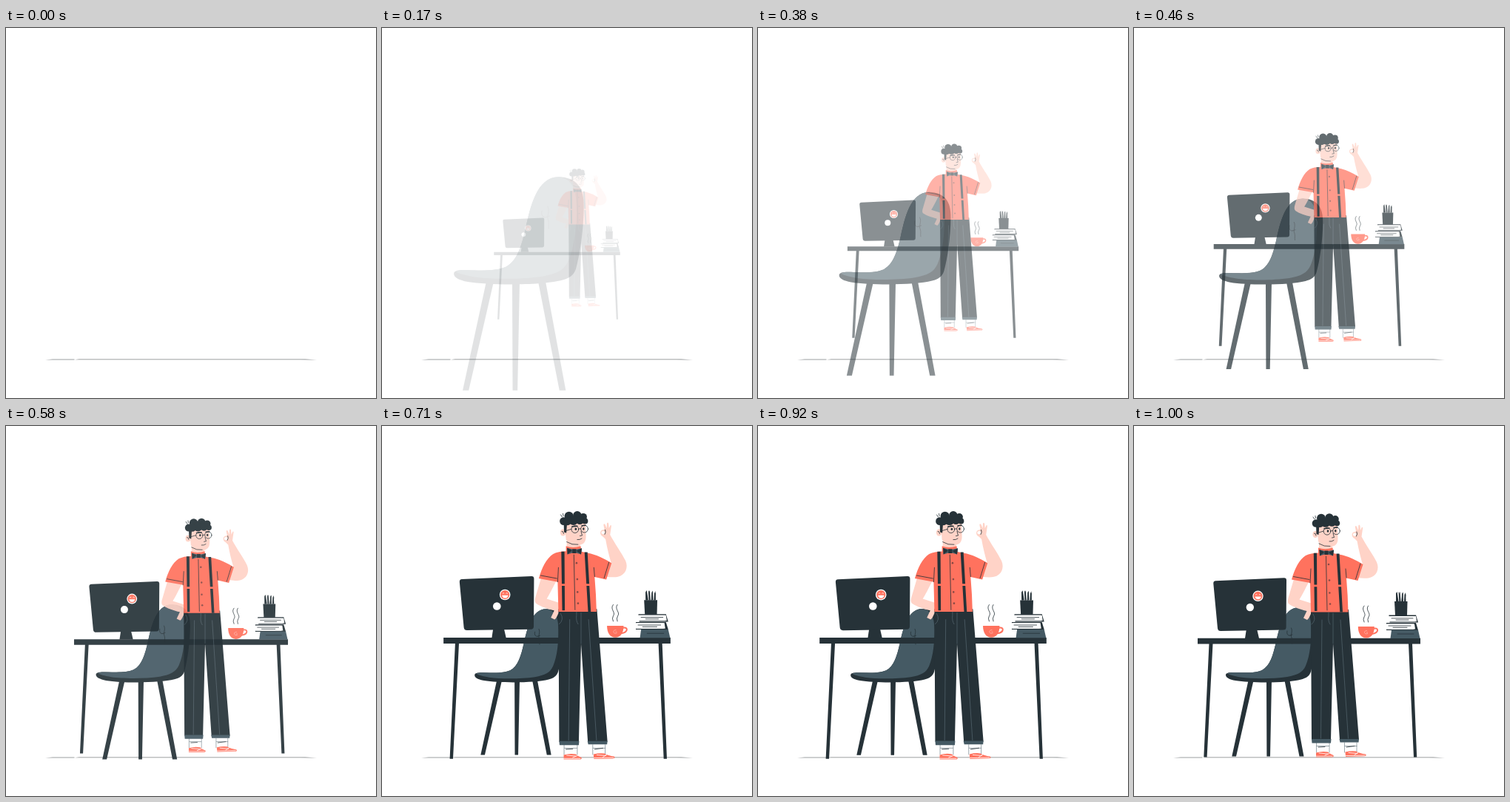
Write an HTML page that moves like this. It is 500 px wide and 500 px high and loops after 1040 ms.

```html
<!DOCTYPE html>
<html lang="en">
<head>
<meta charset="utf-8">
<title>Office scene</title>
<style>
  html, body { margin: 0; width: 100%; height: 100%; overflow: hidden; background: #fff; }
  svg { display: block; width: 100%; height: 100%; }
  .group { opacity: 0; }
  .dark { fill: #263238; }
  .slate { fill: #455a64; }
  .red { fill: #ff725e; }
  .skin { fill: #ffd3c7; }
  .white { fill: #fff; }
  .line { fill: none; stroke: #263238; stroke-width: .8; stroke-linecap: round; stroke-linejoin: round; }
  .soft { stroke: #5d6f78; stroke-width: .6; }
  .pale { stroke: #fff; }
</style>
</head>
<body>
<svg viewBox="0 0 500 500">
  <!-- floor -->
  <g fill="#bdbfc0">
    <path d="M53 448.8L63 447.2H92.5V448.7Z"/>
    <path d="M93 448.3L99 447H404L420 448.8H408L398 448.5H97Z"/>
  </g>

  <g class="group" data-x="186" data-y="346.5" data-from="1.5">
    <path class="dark" d="M154.500 344H161.500L138 446.500H132.300ZM179 345H186L184 446.500H179.400ZM203.500 344H210.500L229.500 446.500H223.500Z"/>
    <path class="dark" d="M124 336.500C124 333 130 332.800 136 333C152 333.500 164 334 173 330C184 324 188 309 191.500 294C196 274 202 245 223 245.200C239 245.500 247 255 246.500 273C246.300 295 243 318 239 332C237 338 233 340.500 226 342.500C207 347.500 158 347.500 137 344C129 342.500 124 340 124 336.500Z"/>
    <path class="slate" d="M126 334.300C130 332.500 136 333 140 333.100C155 333.500 165 333.500 173 330C184 324 188 309 191.500 294C196 274 202 245 223 245.200C236 246.500 239.500 259 239.500 274C239.500 291 238 310 232 324C228 333 221 336.500 207 339C188 341.800 160 341.800 144 339.500C135 338 129 336.500 126 334.300Z"/>
    <path class="line" d="M212.500 273C215 278 211 282 213 286C214 289 213 291 213.500 294M207 277C206 281 208 284 211 283M211 283L214 282"/>
  </g>

  <g class="group" data-x="236.600" data-y="323.600" data-from=".5">
    <path class="dark" d="M86 286.800H387V294.500H86ZM101.500 294H106.500L98.600 447.500H94.300ZM371 294H376L382.200 447.500H378Z"/>

    <path class="dark" d="M152 274H166L169 287H150Z"/>
    <path class="dark" d="M110.500 209.300L202.500 205.200Q206 205 206 208.500L205.600 272Q205.500 275.500 202 275.600L117 277Q113.500 277 113 273.500L107.300 213Q107 209.500 110.500 209.300Z"/>
    <circle class="white" cx="167.500" cy="229.800" r="7.200"/>
    <circle class="red" cx="167.500" cy="229.800" r="6"/>
    <path class="white" d="M163.500 230.500H171.700Q171 234.300 167.600 234.300Q164.300 234.300 163.500 230.500Z"/>
    <path class="line pale" d="M164.300 228Q165.300 226.500 166.300 228M169 228Q170 226.500 171 228"/>
    <circle class="white" cx="156.800" cy="245" r="5.200"/>

    <path class="line" d="M311 243C306 249 315 253 311 258Q309 261 311 265M316.500 243C312 249 321 253 317 258Q315 261 316.500 265"/>
    <path fill="none" stroke="#ff725e" stroke-width="2" d="M322.500 274C331 271 332 280 321 281"/>
    <path class="red" d="M302.800 271H324.800C325 280 321 286.500 313.800 286.500C306.500 286.500 302.800 280 302.800 271Z"/>
    <path fill="none" stroke="#ffaa9e" stroke-width=".9" d="M315 276.500Q311 276.500 311.500 279.500Q312.500 282 316 280.500M314 279H316"/>

    <path class="line" stroke-width="1.600" d="M355 237L354.500 227M359 237L358 225M362 237L363 226M366 237L367 228"/>
    <path class="dark" d="M354 226L355.500 224L357.500 237H354ZM358 227L359.500 224L360.500 237H358.500ZM361.500 237L362 227L363.500 224.500L364 237ZM365 237L365.500 228L367 225L367.500 237Z"/>
    <path class="dark" d="M352 237H369.500L369 256H353Z"/>
    <path class="dark" d="M344.500 255.500H381L384 265.500H345.500V264.300H380V257H344.500Z"/>
    <path class="white" d="M345 257H381L382 264.200H345.500Z"/>
    <path class="line" d="M348 259.800H377M354 262H371"/>
    <path class="dark" d="M341 266H381L384 276H341V274.700H378V267.400H341Z"/>
    <path class="white" d="M341.500 267.400H379L380 274.600H341.500Z"/>
    <path class="line" d="M344 270H374M350 272.300H369"/>
    <path class="slate" d="M348 275.800H384L386.500 287H346.500Z"/>
    <path class="line" stroke-width="1.400" d="M356 281H378"/>
  </g>

  <g class="group" data-x="269.500" data-y="283.600" data-from=".5">
    <!-- arm on hip -->
    <path class="skin" d="M216 207L236 211C231 221 227 229 223.500 234.500L241 240V250C238 255 237 260 234 262L229 259.500L233.500 250C225 248 216 245 210 241C206.500 238.500 208 234 209.500 229Z"/>

    <!-- shoes and socks -->
    <path class="white" d="M246.500 427H264V442H246.500ZM284.500 427H301V442H284.500Z"/>
    <path class="line soft" d="M247 432.500H263.500M285 432.500H301M246.500 428V441M264 428V441M284.500 428V441M301 428V441"/>
    <path class="line" d="M249 434L258 433.500M287 434L298 432.500"/>
    <path class="red" d="M246 441.500Q254 439 262 440.500Q264.500 443 269.500 445Q270.500 447.500 267 447.500H246ZM285.500 440.500Q294 438.500 300 439.500Q305 442.500 313 443.500Q315 446 311 446.300L286 447Z"/>
    <path class="line pale" d="M246 446.200H268M250 442L262 443M258 445L264 442.500M286 445.600L312 445M290 441.500L302 442.500M298 444.500L303 441"/>

    <!-- trousers -->
    <path class="dark" d="M239 248H290L304 424H278L269 294L266 424H240Z"/>
    <path class="slate" d="M240 423H266.500L266 428.500H240.500ZM277.500 423H304L303.500 427.500H278.500Z"/>
    <path class="line soft" d="M254 262L252.500 422M279 262L289.500 422M263 252V256Q262 264 265 268M269 253V294M242 254Q247 262 240 268"/>

    <!-- raised arm -->
    <path class="skin" d="M303 186L309 187C306 177 303.500 167 301.500 155.500L298 152C294 150 293.500 145.500 296.500 143.500L300 142.500L298.800 136.500Q299.300 134 301 136L303 141L303.300 134.500Q304.800 132.200 305.500 135L306 141L307.800 137Q309.600 136 309 139L307.500 149.500C313 160 323 174 328 184C332 193 328 203 318 205.300Q311 206.500 302 205Z"/>
    <ellipse class="white" cx="298.300" cy="146.700" rx="2.400" ry="2.100"/>
    <path class="line" stroke-width=".4" d="M301 143Q302.500 146 300.500 149"/>

    <!-- neck and shirt -->
    <path class="skin" d="M250 155H268V174H250Z"/>
    <path class="red" d="M249 164.500Q258 168 268.500 164.500L269.500 172L282 174.500Q295 178 309.500 187L302.500 209L287 205.500Q289 229 289.500 251.500H239L238 212L213 207.500C217 193 223 181 232 175Q239 171.500 249 171.500Z"/>
    <path class="line" d="M215.500 203.500L237 207.500M306 186L299.500 207M238 212L239 193M287 205L286 193" stroke-width=".6"/>
    <path class="line" stroke-width=".5" d="M259.500 176L261 249"/>
    <path class="dark" d="M242.800 171.800H247L247.500 250H244ZM273.600 172.500H277.500L282 251.500H278.300Z"/>
    <path class="red" d="M242 214.500H248.500V217.300H242ZM275 214.500H281V217.300H275Z"/>
    <g fill="#8b4a45">
      <circle cx="263" cy="187" r="1.300"/><circle cx="264" cy="208.500" r="1.300"/>
      <circle cx="264.300" cy="225.500" r="1.300"/><circle cx="265" cy="240.500" r="1.300"/>
    </g>
    <path class="slate" d="M250.500 167L260 169.500L270 167.500L269 175.500L260 172.800L251 175.500Z"/>
    <path class="dark" d="M257.500 168.500H262.500V174H257.500ZM250.500 167L257 170.500L251 175.500ZM270 167.500L263 171L269 175.500Z"/>

    <!-- head -->
    <ellipse class="skin" cx="245" cy="146.500" rx="3.600" ry="4.600"/>
    <path class="skin" d="M247 130H275L275.500 152Q275.500 163 265 163Q254 163.500 249 156Z"/>
    <path class="line" stroke-width=".5" d="M243.500 145Q245.500 144 246 148M250 159Q257 163.500 265 162.500"/>
    <path class="dark" d="M246 133H250.500L249.500 147L246.500 146Z"/>
    <g class="dark">
      <circle cx="246" cy="131.500" r="5.300"/><circle cx="253" cy="124.800" r="6"/>
      <circle cx="264" cy="123.800" r="5.600"/><circle cx="272" cy="125.800" r="4.800"/>
      <circle cx="274.300" cy="131.300" r="3.900"/><circle cx="259" cy="130.500" r="6.300"/>
      <circle cx="267.500" cy="130.500" r="5.300"/><circle cx="251" cy="131.500" r="5.500"/>
    </g>
    <path class="line" stroke-width=".6" d="M242 123L244 126M245 121.500L245.500 124.500"/>
    <g class="line" stroke-width=".7">
      <circle cx="261" cy="142.300" r="4.800"/><circle cx="273.500" cy="141.800" r="4.800"/>
      <path d="M248 144.500L256.200 142M265.800 142Q267.300 140.500 268.700 141.700M269 145L270.500 150.500L267.500 151M264 156Q267.500 156.500 270 154.500"/>
      <path stroke="#263238" stroke-width="1.500" d="M257 138.800L264 138M270 137.500L275 137"/>
    </g>
    <ellipse class="dark" cx="262" cy="142" rx="1.300" ry="1.700"/>
    <ellipse class="dark" cx="272.300" cy="141.700" rx="1.200" ry="1.700"/>
  </g>
</svg>
<script>
  const LOOP = 1040, FPS = 24, LEAD = 0.025;
  const groups = [...document.querySelectorAll('.group')].map(el => ({
    el, x: +el.dataset.x, y: +el.dataset.y, from: +el.dataset.from
  }));

  const bezier = (a, b, u) => 3 * (1 - u) ** 2 * u * a + 3 * (1 - u) * u * u * b + u ** 3;

  // cubic-bezier(.36, -.01, .5, 1.38), solved by bisection
  function ease(x) {
    if (x >= 1) return 1;
    let lo = 0, hi = 1;
    for (let i = 0; i < 30; i++) {
      const mid = (lo + hi) / 2;
      if (bezier(.36, .5, mid) < x) lo = mid; else hi = mid;
    }
    return bezier(-.01, 1.38, lo);
  }

  // 24 steps a second, each starting on the nearest 10 ms
  const stepAt = t => Math.ceil((Math.floor(t / 10) + .5) * 6 / 25) - 1;

  function draw(t) {
    const step = stepAt(t);
    const p = step < 2 ? 0 : ease(step / FPS + LEAD);
    for (const { el, x, y, from } of groups) {
      const s = from + (1 - from) * p;
      el.style.opacity = Math.min(1, Math.max(0, p));
      el.setAttribute('transform', `translate(${x} ${y}) scale(${s}) translate(${-x} ${-y})`);
    }
  }

  const start = performance.now();
  function tick() {
    draw((performance.now() - start) % LOOP);
    requestAnimationFrame(tick);
  }
  tick();
</script>
</body>
</html>
```
